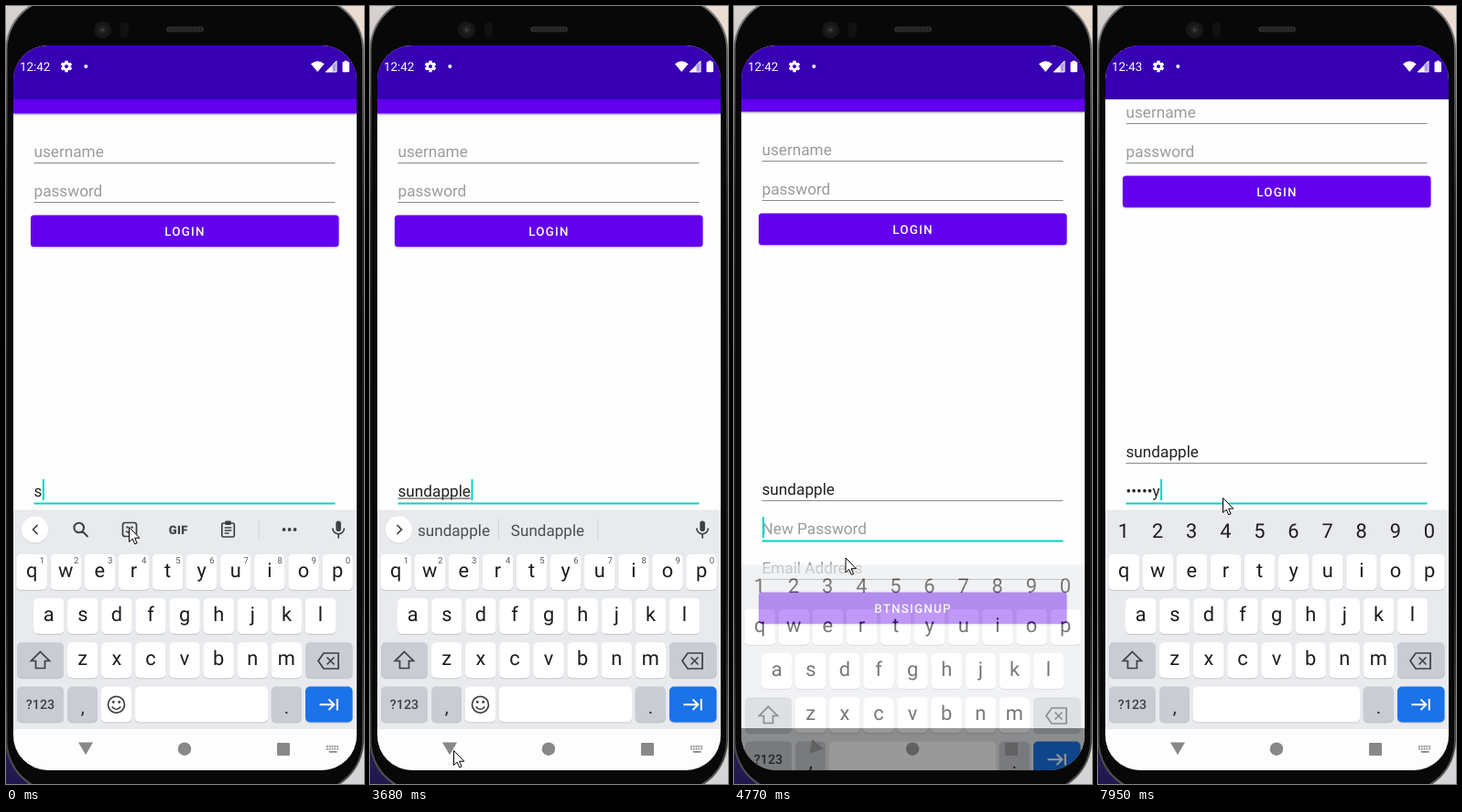
Recreate the animation shown at these times as an HTML page with a canvas. Size 391 px wide and 850 px high, loop 8000 ms.

```html
<!DOCTYPE html>
<html lang="en">
<head>
<meta charset="utf-8">
<title>Sign-up form</title>
<style>
  html, body { margin: 0; width: 100%; height: 100%; overflow: hidden; background: #111; }
  canvas { display: block; }
</style>
</head>
<body>
<canvas id="stage" width="391" height="850"></canvas>
<script>
const LOOP = 8000, W = 391, H = 850;
const PURPLE = '#6200ee', TEAL = '#03d5c1', INK = '#3c4043';
const APP = 'moltgrebeclone', USER = 'sundapple', PASS = 'pebbly';

const stage = document.getElementById('stage').getContext('2d');
const keyboardLayer = Object.assign(document.createElement('canvas'), { width: W, height: H });
const keyLayer = keyboardLayer.getContext('2d');
let g = stage; // context the helpers draw on

// Timeline: each row holds from its time until the next one.
const userTimes = [0, 270, 400, 550, 690, 840, 990, 1280, 1410];
const passTimes = [5620, 5900, 6070, 6230, 6400, 6560];
const caretOff = [[2000, 2420], [2990, 3420], [4070, 4620], [5040, 5620], [7140, 7560]];
const panel = [ // time, keyboard offset, keyboard alpha, page shift, back arrow angle
  [0, 0, 1, -38, 0], [3830, 35, .8, -14, 45], [3950, 149, .18, -1, 75],
  [4070, 0, 0, 0, 90], [4770, 60, .6, -40, 40], [4920, 0, 1, -81, 0]
];
const navGray = [[0, 136], [4770, 97], [6840, 117], [7140, 136]];
const pointer = [
  [0, 134.5, 569.5], [2000, 150, 545], [2150, 190, 480], [2290, 228, 425], [2420, 239.5, 415.5],
  [2850, 232, 440], [3000, 205, 520], [3120, 170, 625], [3270, 140, 715], [3420, 115, 785],
  [3550, 95, 812], [3680, 91.5, 813.5], [3950, 100.5, 769.5], [4070, 112, 720], [4210, 124, 660],
  [4350, 131, 618], [4470, 131.5, 610.5], [4770, 122, 603], [4920, 106.5, 594.5],
  [7560, 109, 589], [7690, 121, 566], [7830, 132, 545], [7950, 136.5, 537.5]
];
const suggestions = {
  s: ['so', 'she'], su: ['sure', 'super'], sun: ['Sunday', 'sunny'], sund: ['Sunday', 'sundae']
};

const at = (rows, t) => rows.filter(row => row[0] <= t).pop();
const countUntil = (times, t) => times.filter(time => time <= t).length;

function box(x, y, w, h, r, fill) {
  g.fillStyle = fill;
  g.beginPath();
  g.roundRect(x, y, w, h, r);
  g.fill();
}
function raisedBox(...args) {
  g.save();
  g.shadowColor = '#0004';
  g.shadowBlur = 2;
  g.shadowOffsetY = 1;
  box(...args);
  g.restore();
}
function disc(x, y, r, fill) {
  g.fillStyle = fill;
  g.beginPath();
  g.arc(x, y, r, 0, 7);
  g.fill();
}
function shape(d, { fill, stroke, width = 1.7, x = 0, y = 0, turn = 0 }) {
  const path = new Path2D(d);
  g.save();
  g.translate(x, y);
  g.rotate(turn * Math.PI / 180);
  if (fill) { g.fillStyle = fill; g.fill(path); }
  if (stroke) { g.strokeStyle = stroke; g.lineWidth = width; g.stroke(path); }
  g.restore();
}
function text(str, x, y, size, color, { align = 'left', weight = 400, spacing = 0 } = {}) {
  g.font = `${weight} ${size}px Roboto, sans-serif`;
  g.textRendering = 'geometricPrecision';
  g.letterSpacing = spacing + 'px';
  g.textAlign = align;
  g.fillStyle = color;
  g.fillText(str, x, y);
  return g.measureText(str).width;
}
function fade(...colors) {
  const gradient = g.createLinearGradient(0, 0, 0, H);
  colors.forEach((color, i) => gradient.addColorStop(i / (colors.length - 1), color));
  return gradient;
}

function drawPhone() {
  box(0, 0, 196, H, 0, fade('#d8d2d0', '#21164f'));
  box(195, 0, 196, H, 0, fade('#ecdcd2', '#d5d5d8'));
  box(-.5, -10, 391.5, 870, 58, fade('#777', '#2a2a2a', '#1c1c1c', '#1c1c1c', '#555'));
  box(1.5, -8, 387.5, 866, 56, '#080808');
  disc(105.5, 26, 9.5, '#171717');
  disc(105.5, 26, 5, '#222');
  disc(105.5, 26, 2, '#3a3a3a');
  box(125, 18, 9, 16, 3, '#111');
  box(175, 22.5, 41, 6, 3, '#2b2b2b');
  for (let x = 179; x < 213; x += 3) box(x, 24, 1, 3, 0, '#171717');
}

function drawField(value, hint, line, { focused, caret, composing } = {}) {
  const width = text(value || hint, 30.5, line - 6.5, 17.2, value ? '#212121' : '#9b9b9b');
  const end = 31 + (value ? width : 0);
  if (composing) box(30.5, line - 5, width, 1, 0, '#333');
  if (focused) box(30.5, line, 329, 2, 0, TEAL);
  else box(30.5, line - .5, 329, 1, 0, '#8a8a8a');
  if (caret) box(end, line - 25.5, 2, 23, 0, TEAL);
}

function drawButton(label, y) {
  raisedBox(27, y, 336.5, 34.5, 3.5, PURPLE);
  text(label, 195.5, y + 22.2, 13.37, '#fff', { align: 'center', weight: 500, spacing: 1.19 });
}

function drawPage(t, shift) {
  const onPass = t >= 4620;
  const caret = !caretOff.some(([from, to]) => t >= from && t < to);
  const typed = countUntil(passTimes, t);
  const secret = typed ? '•'.repeat(typed - 1) + PASS[typed - 1] : '';
  box(8, 43, 375, 792, 0, '#fefefe');
  g.save();
  g.translate(0, shift);
  raisedBox(8, 102, 375, 53.5, 0, PURPLE);
  text(APP, 23, 136, 19.1, '#fff', { weight: 500 });
  drawField('', 'username', 209.5);
  drawField('', 'password', 252.5);
  drawButton('LOGIN', 266.5);
  drawField(USER.slice(0, countUntil(userTimes, t)), '', 580.5,
    { focused: !onPass, caret: !onPass && caret, composing: t >= 120 && t < 3950 });
  drawField(secret, 'New Password', 623.5, { focused: onPass, caret: onPass && caret });
  drawField('', 'Email Address', 666.5);
  drawButton('BTNSIGNUP', 680.5);
  g.restore();
}

function drawStatusBar(t) {
  box(8, 43, 375, 59, 0, '#3700b3');
  text(t < 7690 ? '12:42' : '12:43', 15, 71.3, 13.37, '#fff');
  for (let turn = 0; turn < 180; turn += 60)
    shape('M-1.7-6.3h3.4v12.6h-3.4z', { fill: '#fff', x: 66, y: 66, turn });
  disc(66, 66, 4.7, '#fff');
  disc(66, 66, 2, '#3700b3');
  disc(87.3, 66, 2, '#fff');
  shape('M333 63.3Q340.3 57 347.6 63.3L340.3 72Z', { fill: '#fff' });
  shape('M361 60V72H349Z', { fill: '#fff9' });
  shape('M356.5 64.5V72H349Z', { fill: '#fff' });
  shape('M356.5 64.5L361 60V72H349', { stroke: '#fff', width: 1 });
  box(367.5, 61, 7.5, 11.3, 1, '#fff');
  box(369.5, 59.7, 3.5, 2, 0, '#fff');
}

function drawKey(x, y, w, fill = '#fff') {
  box(x, y + 1, w, 39, 5, '#c3c6cb');
  box(x, y, w, 39, 5, fill);
}

function drawLetters(letters, firstX, y, digits) {
  [...letters].forEach((letter, i) => {
    const x = firstX + 37.1 * i;
    drawKey(x - 16.7, y, 33.4);
    text(letter, x, y + 25, 21.8, '#1d1d1f', { align: 'center' });
    if (digits) text((i + 1) % 10, x + 11.3, y + 10, 9.6, '#55585c', { align: 'center' });
  });
}

function drawToolbar() {
  shape('M85 570a5.3 5.3 0 1 1-10.6 0a5.3 5.3 0 1 1 10.6 0M83.5 574L89.5 580', { stroke: INK, width: 2 });
  g.strokeStyle = INK;
  g.lineWidth = 1.7;
  g.beginPath();
  g.roundRect(127.5, 564.5, 15, 15, 2.5);
  g.roundRect(235.8, 565, 13.5, 15, 1.5);
  g.stroke();
  disc(132.5, 569.5, 1.2, INK);
  disc(137.5, 569.5, 1.2, INK);
  shape('M131 573.5Q135 577.5 139 573.5', { stroke: INK });
  text('GIF', 188.3, 576.7, 13, INK, { align: 'center', weight: 900, spacing: .4 });
  box(239.3, 562.5, 6.5, 4.5, 1, INK);
  shape('M238.7 570h7.7M238.7 573h7.7M238.7 576h5', { stroke: INK, width: 1.4 });
  box(275.5, 562, 1, 20, 0, '#cfd2d6');
  for (const x of [303.6, 309.6, 315.6]) disc(x, 572, 1.9, INK);
}

function drawSuggestions(t) {
  const word = USER.slice(0, countUntil(userTimes, t));
  const [best, other] = suggestions[word] || ['S' + USER.slice(1), ''];
  const style = { align: 'center' };
  [[word, 91.5], [best, 194], [other, 303]].forEach(([label, x]) => text(label, x, 578.5, 17.1, '#4b4e53', style));
  for (const x of [140, 248.5]) box(x, 560, 1, 24, 0, '#cdd0d4');
}

function drawStrip(t) {
  const open = t < 120;
  disc(31.5, 572.7, 14.8, '#d3d5d9');
  disc(31.5, 572, 14.6, '#fff');
  shape('M-2.5-5L2.5 0L-2.5 5', { stroke: INK, x: 32, y: 572, turn: open ? 180 : 0 });
  if (open) drawToolbar();
  else if (t < 3950) drawSuggestions(t);
  box(360.3, 562.5, 5.6, 11.5, 2.8, INK);
  shape('M356.8 570.5a6.3 6.3 0 0 0 12.6 0M363.1 577v4.5', { stroke: INK });
}

function drawKeyboard(t) {
  const secure = t >= 4620, special = '#c9ccd2';
  box(0, 550.5, W, 240, 0, '#e8eaed');
  box(0, 790, W, 60, 0, '#fdfdfd');
  if (secure) {
    [...'1234567890'].forEach((digit, i) =>
      text(digit, 28 + 37.1 * i, 580.5, 21.8, '#1d1d1f', { align: 'center' }));
  } else drawStrip(t);
  drawLetters('qwertyuiop', 28.2, 599, !secure);
  drawLetters('asdfghjkl', 46.7, 647);
  drawLetters('zxcvbnm', 83.7, 695.3);

  drawKey(12, 695.3, 51, special);
  shape('M37.5 705.5L47.5 715.5H42.5V723.5H32.5V715.5H27.5Z', { stroke: INK });
  drawKey(327, 695.3, 51.5, special);
  shape('M341 715.5L347 707H363V724H347ZM350.5 711.5l8 8m0-8l-8 8', { stroke: INK });

  const bottom = 743.5;
  drawKey(12, bottom, 51, special);
  text('?123', 37.5, 768.3, 14.3, INK, { align: 'center', weight: 500 });
  drawKey(67.3, bottom, 32.7, special);
  text(',', 83.7, 773, 20, '#222', { align: 'center' });
  if (!secure) {
    drawKey(104, bottom, 33);
    shape('M129.5 763.3a9 9 0 1 1-18 0a9 9 0 1 1 18 0M115.7 765.5q4.8 6 9.6 0', { stroke: INK });
    disc(117.3, 760.5, 1.4, INK);
    disc(123.7, 760.5, 1.4, INK);
  }
  const spaceX = secure ? 104 : 141;
  drawKey(spaceX, bottom, 286 - spaceX);
  drawKey(289.7, bottom, 33.3, special);
  text('.', 306.3, 773, 20, '#222', { align: 'center' });
  drawKey(327, bottom, 51.5, '#1a73e8');
  shape('M342.5 763.3H358M352.5 757.5L358.3 763.3L352.5 769.1M361.8 757v12.6', { stroke: '#fff', width: 2 });
}

function drawNavIcons(t, alpha, angle) {
  const tone = alpha < .5 ? 255 : at(navGray, t)[1];
  const color = `rgb(${tone},${tone},${tone})`;
  shape('M-8-6.8H8L0 7Z', { fill: color, x: 87, y: 811.3, turn: angle });
  disc(195, 811.7, 7.2, color);
  box(296, 805, 14, 14, 1, color);
  if (alpha > 0 && alpha < 1) return;
  for (let row = 0; row < 2; row++)
    for (let x = 350; x < 364; x += 2.8) box(x, 808 + row * 2.8, 1.8, 1.8, 0, color);
  box(353, 814, 8.5, 1.8, 0, color);
}

function render(t) {
  const [, offset, alpha, shift, angle] = at(panel, t);
  g = keyLayer;
  g.clearRect(0, 0, W, H);
  drawKeyboard(t);

  g = stage;
  drawPhone();
  g.save();
  g.beginPath();
  g.roundRect(8, 43, 375, 792, 38);
  g.clip();
  drawPage(t, shift);
  drawStatusBar(t);
  box(8, 789, 375, 46, 0, '#000');
  g.globalAlpha = alpha;
  g.drawImage(keyboardLayer, 0, offset);
  g.globalAlpha = 1;
  drawNavIcons(t, alpha, angle);
  g.restore();

  const [, x, y] = at(pointer, t);
  shape('M0 0V16L3.7 12.6L6.3 18.4L8.6 17.4L6.1 11.7H11.3Z', { fill: '#fff', stroke: '#000', width: 1, x, y });
}

function tick() {
  render(performance.now() % LOOP);
  requestAnimationFrame(tick);
}
tick();
</script>
</body>
</html>
```
